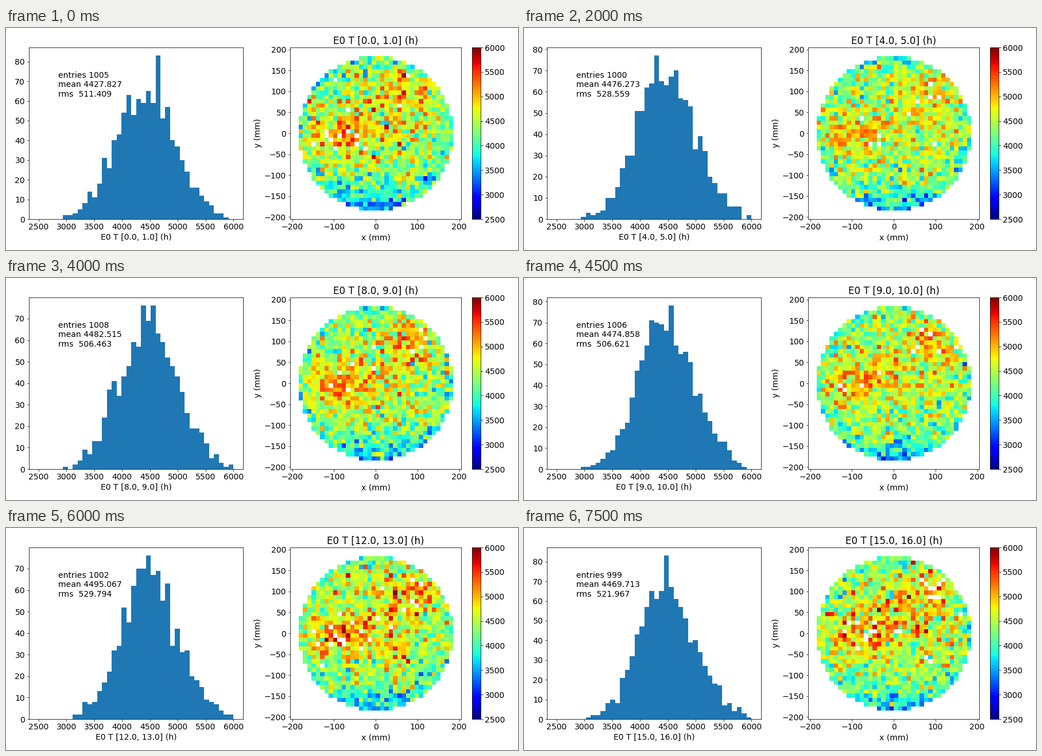
A matplotlib script for the animation above (8000 ms loop, 892 by 388 pixels).

```python
import numpy as np
import matplotlib.pyplot as plt
from matplotlib.animation import FuncAnimation

W, H, DPI = 892, 388, 72
HOURS = 16
LO, HI, BINS = 2500, 6000, 40
GRID, HALF = 40, 205

# Key points: hour, entries, mean, rms, tallest bin; linear in between
KEYS = np.array([
    (0, 1005, 4427.827, 511.409, 83),
    (2, 990, 4451.456, 512.685, 68),
    (4, 1000, 4476.273, 528.559, 77),
    (8, 1008, 4482.515, 506.463, 76),
    (10, 1003, 4467.201, 506.779, 79),
    (12, 1002, 4495.067, 529.794, 76),
    (15, 999, 4469.713, 521.967, 83),
]).T

edges = np.linspace(LO, HI, BINS + 1)
step = edges[1] - edges[0]
mids = edges[:-1] + step / 2

# Disc of detector cells, with a slow spatial trend
axis = np.arange(GRID) - (GRID - 1) / 2
gx, gy = np.meshgrid(axis, axis)
disc = gx**2 + gy**2 < 18**2
u, v = gx[disc] / 18, gy[disc] / 18


def bump(x, y, sx, sy):
    return np.exp(-((u - x) / sx)**2 - ((v - y) / sy)**2)


trend = (1.2 * bump(0.5, 0.6, 0.35, 0.25) + 1.1 * bump(-0.5, -0.02, 0.5, 0.25)
         + 0.5 * bump(0.1, 0.2, 0.8, 0.4) - 1.1 * bump(0, -1, 0.7, 0.3)
         - 0.7 * (u**2 + v**2)**4)


def stats_at(hour):
    entries, mean, rms, peak = (np.interp(hour, KEYS[0], row) for row in KEYS[1:])
    return round(entries), mean, rms, round(peak)


def histogram(entries, mean, peak, rng):
    """Skewed bell with counting noise, capped at the tallest bin."""
    d = mids - (mean - 80)
    curve = np.exp(-0.5 * (d / np.where(d < 0, 465, 575))**2)
    curve *= entries / curve.sum()
    noise = rng.normal(0, 0.75, BINS) * np.sqrt(curve)
    counts = np.clip(np.round(curve + noise), 0, peak).astype(int)
    counts[curve < 0.6] = 0
    counts[counts.argmax()] = peak
    return counts


def cell_map(counts, rng):
    """Spread the histogram's energies over the disc by rank."""
    energy = np.repeat(edges[:-1], counts)
    energy = np.sort(energy + step * rng.random(energy.size))
    order = np.argsort(trend + rng.normal(0, 0.75, u.size))
    n = min(energy.size, u.size - 10)
    cells = np.full(u.size, np.nan)
    cells[order[:n]] = energy[:n]
    image = np.full((GRID, GRID), np.nan)
    image[disc] = cells
    return image


plt.rcParams["font.size"] = 14
# The tiny margin keeps float rounding from dropping a pixel
fig = plt.figure(figsize=((W + 1e-6) / DPI, (H + 1e-6) / DPI), dpi=DPI,
                 facecolor="white")


def panel(x0, x1, y0=34.1, y1=334):
    return fig.add_axes([x0 / W, 1 - y1 / H, (x1 - x0) / W, (y1 - y0) / H])


hist_ax, map_ax, bar_ax = panel(40.1, 413.1), panel(495.1, 793.2), panel(812, 827)

bars = hist_ax.bar(edges[:-1], np.zeros(BINS), width=step, align="edge",
                   color="#1f77b4")
hist_ax.set_xlim(LO - 175, HI + 175)
hist_ax.set_xticks(np.arange(LO, HI + 1, 500))
note = fig.text(90.9 / W, 1 - 119.6 / H, "", va="baseline")

img = map_ax.imshow(np.full((GRID, GRID), np.nan), cmap="jet", vmin=LO, vmax=HI,
                    origin="lower", extent=(-HALF, HALF, -HALF, HALF),
                    aspect="auto", interpolation="nearest")
map_ax.set_xticks(np.arange(-200, 201, 100))
map_ax.set_yticks(np.arange(-200, 201, 50))
map_ax.set_xlabel("x (mm)")
map_ax.set_ylabel("y (mm)")
fig.colorbar(img, cax=bar_ax, ticks=np.arange(LO, HI + 1, 500))


def draw(hour):
    rng = np.random.default_rng(100 + hour)
    entries, mean, rms, peak = stats_at(hour)
    counts = histogram(entries, mean, peak, rng)
    for bar, n in zip(bars, counts):
        bar.set_height(n)
    top = 1.05 * peak
    hist_ax.set_ylim(0, top)
    hist_ax.set_yticks(np.arange(0, top, 10))
    label = f"E0 T [{hour}.0, {hour + 1}.0] (h)"
    hist_ax.set_xlabel(label)
    map_ax.set_title(label)
    note.set_text(f"entries {entries}\nmean {mean:.3f}\nrms  {rms:.3f}")
    img.set_data(cell_map(counts, rng))
    return []


anim = FuncAnimation(fig, draw, frames=HOURS, interval=500, repeat=True,
                     repeat_delay=0, blit=False)
plt.show()
```
